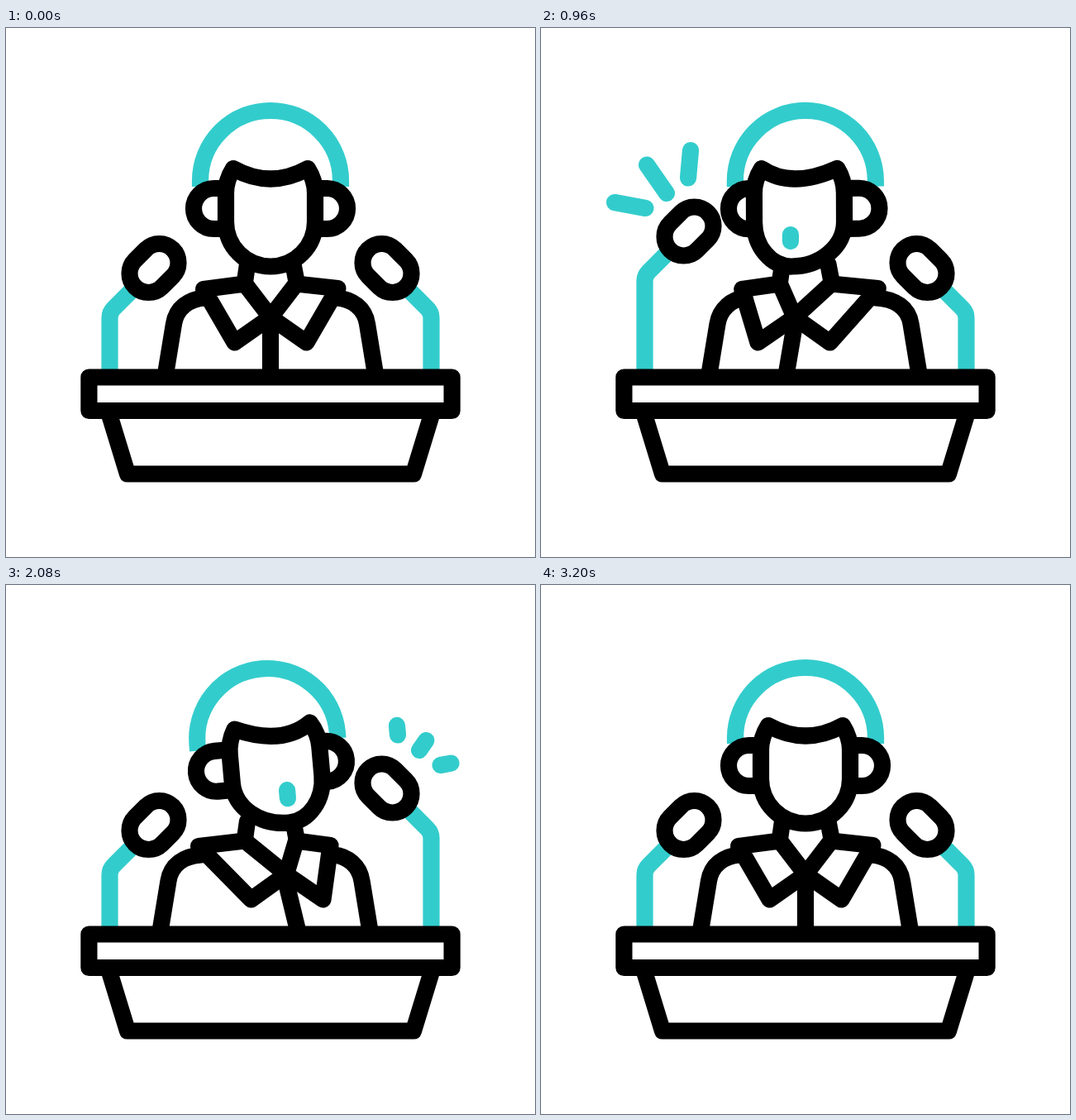
Write an HTML page with a canvas that moves like this. It is 640x640 px and loops after 3.6 s.

```html
<!DOCTYPE html>
<html lang="en">
<head>
<meta charset="utf-8">
<title>Speaker at a podium</title>
<style>
html, body { margin: 0; width: 100%; height: 100%; overflow: hidden; background: #fff; }
canvas { display: block; width: 100vw; height: 100vh; }
</style>
</head>
<body>
<canvas id="stage" width="640" height="640"></canvas>
<script>
const ctx = document.getElementById('stage').getContext('2d');
const INK = '#000', TEAL = '#33cccc', LINE = 20.2;
const LOOP = 3600, REST = 3200;
const TURN = 1610;   // delay between the left and the right speech
const ARRIVE = 400, LEAVE = 1190, BACK = 1590;
const KAPPA = 0.5523;

const clamp = (v) => Math.max(0, Math.min(1, v));
const ease = (v) => (1 - Math.cos(Math.PI * clamp(v))) / 2;

function stroke(color = INK, fill = false, width = LINE) {
  if (fill) { ctx.fillStyle = '#fff'; ctx.fill(); }
  ctx.strokeStyle = color;
  ctx.lineWidth = width;
  ctx.stroke();
}

function poly(pts, closed) {
  ctx.beginPath();
  for (let i = 0; i < pts.length; i += 2) ctx.lineTo(pts[i], pts[i + 1]);
  if (closed) ctx.closePath();
}

// Runs a drawing step, mirrored within the given width when flip is set
function sided(flip, step, width = 640) {
  ctx.save();
  if (flip) {
    ctx.translate(width, 0);
    ctx.scale(-1, 1);
  }
  step();
  ctx.restore();
}

function mic(lift) {
  ctx.translate(0, -44.5 * lift);
  ctx.beginPath();
  ctx.moveTo(125.5, 458);
  ctx.arcTo(125.5, 344, 160, 309.5, 16);
  ctx.lineTo(160, 309.5);
  stroke(TEAL);
  ctx.beginPath();
  ctx.arc(185.5, 284, 23, -Math.PI * 0.75, Math.PI * 0.25);
  ctx.arc(172.5, 297, 23, Math.PI * 0.25, Math.PI * 1.25);
  ctx.closePath();
  stroke(INK, true);
}

function shoulder(start, shift) {
  ctx.beginPath();
  ctx.moveTo(start, 326.5);
  ctx.bezierCurveTo(221 + shift, 328, 206 + shift, 339, 203 + shift, 358);
  ctx.lineTo(192.5 + shift, 422);
  stroke();
}

function body(q, toRight) {
  const twist = q * (toRight ? 20 : -14);
  const shift = q * (toRight ? -6.5 : 10.5);
  const knot = 320 + 0.95 * twist;
  sided(false, () => shoulder(240 + 0.6 * shift, shift));
  sided(true, () => shoulder(240 - 0.5 * shift, -shift));
  poly([292, 286, 289, 307]); stroke();
  poly([347.5, 286, 351.5, 307]); stroke();
  poly([320 + 0.85 * twist, 352, 320 + 1.7 * twist, 422]); stroke();
  poly([239 - 0.3 * twist, 316, 289, 309.5, knot, 350, 276.5 + twist, 380.5], true); stroke();
  poly([401.5 - 0.45 * twist, 315, 351, 309.5, knot, 350, 363.5 + twist, 380.5], true); stroke();
}

function ear(x, end, side) {
  ctx.beginPath();
  ctx.moveTo(end, 194);
  ctx.arc(x, 218.5, 24.5, -Math.PI / 2, Math.PI / 2, side < 0);
  ctx.lineTo(end, 243);
  stroke(INK, true);
}

// Fringe, sides, and a jaw of two quarter ellipses that meet at the chin
function face(l, r, q) {
  const chin = 320 - 17 * q, jaw = 234.5, low = 288.5;
  const drop = jaw + (low - jaw) * KAPPA;
  const peakL = 275 - 8 * q, peakR = 365 - 6.5 * q;
  ctx.beginPath();
  ctx.moveTo(peakL, 170);
  ctx.quadraticCurveTo(chin, 195, peakR, 170);
  ctx.quadraticCurveTo(r, 184, r, 200);
  ctx.lineTo(r, jaw);
  ctx.bezierCurveTo(r, drop, chin + (r - chin) * KAPPA, low, chin, low);
  ctx.bezierCurveTo(chin + (l - chin) * KAPPA, low, l, drop, l, jaw);
  ctx.lineTo(l, 200);
  ctx.quadraticCurveTo(l, 184, peakL, 170);
  ctx.closePath();
  stroke(INK, true);
}

function head(q, tilt, mouth) {
  const pivot = 320 - 10 * q;
  const l = 266 - 8 * q, r = 374 - 7 * q;
  ctx.translate(pivot, 228);
  ctx.rotate(tilt * Math.PI / 180);
  ctx.translate(-pivot, -228);

  ctx.lineCap = 'butt';
  ctx.beginPath();
  ctx.moveTo(235, 192);
  ctx.arc(320, 185, 85, Math.PI, 0);
  ctx.lineTo(405, 192);
  stroke(TEAL);
  ctx.lineCap = 'round';

  ear(251.5, l, -1);
  ear(388.5 - 3.5 * q, r, 1);
  face(l, r, q);

  if (mouth > 0) {
    const x = 320 - 18.2 * q, h = (4 + Math.max(0, tilt) * 0.2) * mouth;
    poly([x, 254 - h, x, 254 + h]);
    stroke(TEAL, false, LINE * mouth);
  }
}

// Three rays grow outwards, hold, then leave from the inner end
function rays(s) {
  const from = clamp((s - 1108) / 147), to = clamp((s - 419) / 147);
  if (to <= from) return;
  for (const [x, y, dx, dy] of [[178, 181.5, 3, -33.5], [152, 200, -24, -34.5], [126.5, 218, -37.5, -7]]) {
    poly([x + dx * from, y + dy * from, x + dx * to, y + dy * to]);
    stroke(TEAL);
  }
}

function podium() {
  poly([123.6, 463, 147, 539.5, 493, 539.5, 516.4, 463]);
  stroke(INK, true);
  poly([100.4, 422.5, 539.6, 422.5, 539.6, 463, 100.4, 463], true);
  stroke(INK, true);
}

// Share of the turn reached: in, hold, back
const turn = (s) => s < LEAVE ? ease(s / ARRIVE) : 1 - ease((s - LEAVE) / (BACK - LEAVE));

// Degrees of head tilt; it rocks twice during the hold
function lean(s) {
  if (s < ARRIVE || s > LEAVE) return 8 * turn(s);
  return 3.65 + 4.35 * Math.cos(4 * Math.PI * (s - 392) / (LEAVE - 392));
}

function draw(t) {
  const toRight = t >= 1600;
  const s = Math.max(0, Math.min(BACK, toRight ? t - TURN : t));
  const q = turn(s);
  const mouth = clamp(Math.min(t, REST - t) / 140);

  ctx.fillStyle = '#fff';
  ctx.fillRect(0, 0, 640, 640);
  ctx.lineCap = ctx.lineJoin = 'round';
  body(q, toRight);
  sided(toRight, () => head(q, lean(s), mouth));
  for (const flip of [false, true]) sided(flip, () => mic(flip === toRight ? q : 0));
  sided(toRight, () => rays(s), 652);
  podium();
}

const start = performance.now();
function tick() {
  const t = (performance.now() - start) % LOOP;
  draw(Math.floor(t / 20) * 20);
  requestAnimationFrame(tick);
}
tick();
</script>
</body>
</html>
```
